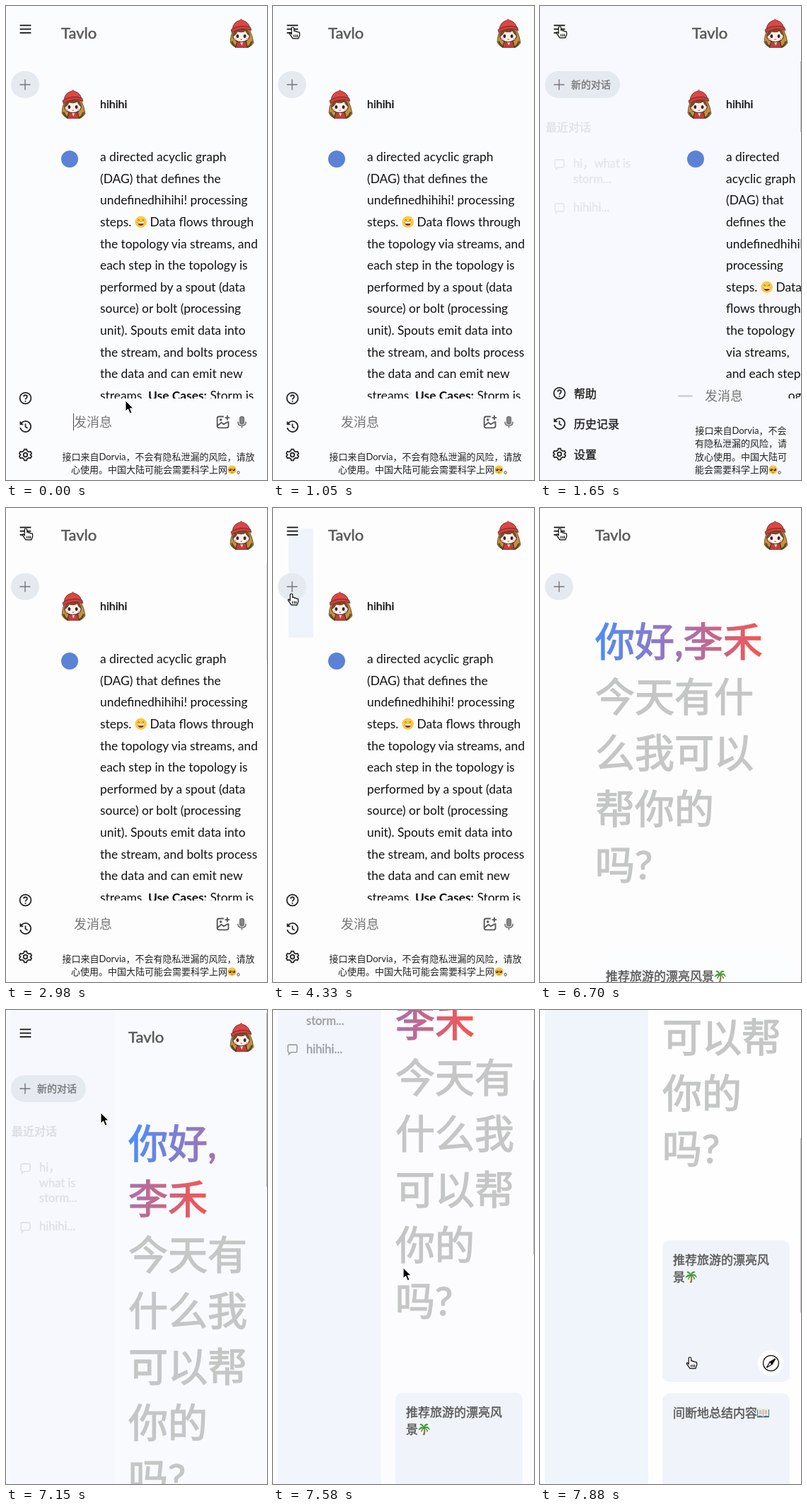
An HTML page for the animation above (8000 ms loop, 369 by 669 pixels).

```html
<!DOCTYPE html>
<html lang="zh-CN">
<head>
<meta charset="utf-8">
<style>
html, body { margin: 0; width: 100%; height: 100%; overflow: hidden; }
body { position: relative; background: #fcfdfe; font-family: Lato, "Noto Sans CJK SC", "Noto Sans CJK", sans-serif; }
div, body > svg, #page svg.icon { position: absolute; }
.text { white-space: pre; }
.emoji { width: 1em; height: 1em; vertical-align: -.13em; }
.hello { background: linear-gradient(90deg, #4b8dfa, #a273b5 50%, #f7554d); -webkit-background-clip: text; background-clip: text; color: transparent; }
#page { width: 369px; height: 1300px; }
#cursor { left: 0; top: 0; overflow: visible; }
</style>
</head>
<body>
<div id="page"></div>
<div id="thumb" style="left:368px;width:1px"></div>
<svg id="cursor" width="20" height="22">
  <path id="arrow" d="M1 0V15L4.6 11.8 7.2 18 9.9 16.9 7.3 10.9H12Z" fill="#000" stroke="#fff"/>
  <path id="hand" transform="scale(.88)" d="M-2 2Q-2 0 0 0T2 2V6Q4 5 5 7Q7 6 8 8Q11 7 11 10V13Q10 15 9 18H0L-5 11Q-6 9-4 9L-2 11ZM2 12V16M5 12V16M7.5 12V16" fill="#fff" stroke="#000" stroke-width="1.3"/>
</svg>
<script>
const LOOP = 8000, CHAT_OPEN = 1650, CHAT_CLOSE = 2830, NEW_CHAT = 4480, HOME_OPEN = 7000;
const SCROLL_START = 7250, SCROLL_END = 7880, SCROLL = 465;
const $ = id => document.getElementById(id);

const icons = {
  menu: '<path d="M3 6H21M3 12H21M3 18H21"/>',
  plus: '<path d="M12 3V21M3 12H21"/>',
  help: '<circle cx="12" cy="12" r="10"/><path d="M9 9.5Q9 6.5 12 6.5T15 9.5Q15 11 13.5 12T12 14.5M12 16.5V18.5"/>',
  history: '<path d="M4 7A9.5 9.5 0 1 1 2.8 14M3 3V8H8M12 7V12.5L16 15"/>',
  gear: '<path d="M10 2H14L15 5 18 6.7 21 6 23 9.5 20.8 12 23 14.5 21 18 18 17.3 15 19 14 22H10L9 19 6 17.3 3 18 1 14.5 3.2 12 1 9.5 3 6 6 6.7 9 5Z"/><circle cx="12" cy="12" r="3.5"/>',
  bubble: '<path d="M5 3H19Q21 3 21 5V16Q21 18 19 18H9L5 22V18Q3 18 3 16V5Q3 3 5 3Z"/>',
  image: '<path d="M13 3H5Q2 3 2 6V19Q2 22 5 22H18Q21 22 21 19V11M3 18L9 13 13 16 20 12M19 1V9M15 5H23"/><circle cx="8" cy="8.5" r="1"/>',
  mic: '<rect x="8.5" y="2" width="7" height="13" rx="3.5" fill="#888"/><path d="M5 11Q5 18 12 18T19 11M12 18V22"/>',
  compass: '<circle cx="12" cy="12" r="10.5"/><path d="M18 6L13.5 13.5 6 18 10.5 10.5Z"/><path d="M10.5 10.5L18 6 13.5 13.5Z" fill="#111"/>'
};
const emojiArt = {
  grin: '<circle cx="9" cy="9" r="8.5" fill="#fdc93f"/><path d="M4.5 7Q5.8 4.5 7 7M11 7Q12.2 4.5 13.5 7" fill="none" stroke="#65401c"/><path d="M4 9.5H14Q13 14.5 9 14.5T4 9.5Z" fill="#803a22"/><path d="M4.5 9.5H13.5V11.5H4.9Z" fill="#fff"/>',
  plead: '<circle cx="9" cy="9" r="8.5" fill="#fcc63a"/><circle cx="5.5" cy="9" r="2.8" fill="#503018"/><circle cx="12.5" cy="9" r="2.8" fill="#503018"/><path d="M7 14.5Q9 13 11 14.5" fill="none" stroke="#65401c"/><circle cx="4.8" cy="8" r="1" fill="#fff"/><circle cx="11.8" cy="8" r="1" fill="#fff"/>',
  palm: '<path d="M8 7Q10 12 7 18H10Q12 12 10 7Z" fill="#a8703a"/><path d="M9 7Q4 4 1 10Q4 8 9 7Q5 9 5 13Q7 9 9 7Q13 8 14 13Q15 9 9 7Q15 6 17 10Q16 3 9 7Q12 2 15 2Q10 0 9 6Q6 0 3 2Q6 3 9 7Z" fill="#3c9a32" stroke="#3c9a32"/>',
  book: '<path d="M0 4H18V16H0Z" fill="#3974a8"/><path d="M1 3Q6 1 9 4Q12 1 17 3V14Q12 12 9 15Q6 12 1 14Z" fill="#f2ead8"/><path d="M9 4V15M3 6H7M3 8H7M3 10H7M11 6H15M11 8H15M11 10H15" stroke="#9b948a" stroke-width=".8"/>'
};
const avatarArt = `<path d="M8 15Q4 24 4 32Q6 38 13 39L14 20ZM30 14Q35 24 36 33Q34 38 27 39L25 20Z" fill="#c4913c" stroke="#5a4020" stroke-width=".8"/>
  <path d="M6 31Q8 37 13 39M34 31Q32 37 28 39" fill="none" stroke="#5b4a25" stroke-width="2.5"/>
  <path d="M14 30H25L28 40H11Z" fill="#c63c38" stroke="#45302a"/><path d="M17 31L20 37 22 31" fill="#f3d8be"/>
  <ellipse cx="19" cy="23.5" rx="11.5" ry="8.5" fill="#fff0ea" stroke="#4b3028"/>
  <path d="M7 25Q8 15 19 13T31 24Q27 22 25 17Q20 20 14 18Q12 23 7 25Z" fill="#7b4a2c"/>
  <path d="M7 14Q8 4 18 2Q28 2 31 12Q19 8 7 14Z" fill="#dc4743" stroke="#652927" stroke-width=".8"/>
  <path d="M5 15Q18 7 32 12L33 16Q20 11 6 19Z" fill="#cf3f3e" stroke="#652927" stroke-width=".8"/><circle cx="19" cy="2" r="1.8" fill="#dc4743"/>
  <ellipse cx="14" cy="24" rx="1.9" ry="2.5" fill="#3b2429"/><ellipse cx="24" cy="24" rx="1.9" ry="2.5" fill="#3b2429"/>
  <circle cx="11" cy="27.5" r="1.5" fill="#f6b6a9"/><circle cx="27" cy="27.5" r="1.5" fill="#f6b6a9"/><path d="M18 28.5H20.5" stroke="#b35349"/>`;

const emoji = name => `<svg class="emoji" viewBox="0 0 18 18">${emojiArt[name]}</svg>`;
const svg = (x, y, size, box, body, attrs = '') =>
  `<svg class="icon" style="left:${x - size / 2}px;top:${y - size / 2}px" width="${size}" height="${size}" viewBox="0 0 ${box} ${box}" ${attrs}>${body}</svg>`;
const icon = (name, x, y, size = 18, color = '#222', weight = 2.2) =>
  svg(x, y, size, 24, icons[name], `fill="none" stroke="${color}" stroke-width="${weight}"`);
const avatar = (x, y) => svg(x, y, 41, 40, avatarArt);
const box = (x, y, w, h, color, radius = 0) =>
  `<div style="left:${x}px;top:${y}px;width:${w}px;height:${h}px;background:${color};border-radius:${radius}px"></div>`;
// y is the middle of the first line
const text = (x, y, html, size, color, lineHeight = 24, extra = '') =>
  `<div class="text" style="left:${x}px;top:${y - lineHeight / 2}px;font-size:${size}px;line-height:${lineHeight}px;color:${color};${extra}">${html}</div>`;
// a thin outline stands in for the medium weight
const medium = '-webkit-text-stroke-width:.025em';

function header(x) {
  return icon('menu', 27, 32, 21, '#111', 2) + text(x, 38, 'Tavlo', 22, '#585858', 28, medium) + avatar(333, 38);
}

function sidebar(open, width, topics) {
  let html = open ? `<div id="side" style="left:7px;top:0;width:${width - 7}px;height:1300px"></div>` : '';
  html += box(7, 92, open ? 106 : 40, 38, '#e5eaf1', 20) + icon('plus', 27, 111, 20, '#777', 1.7);
  if (!open) return html;
  html += text(44, 111, '新的对话', 14, '#777', 24, medium) + '<div id="recent">' +
    text(8, 171, '最近对话', 16, '#333', 24, 'font-weight:700');
  let y = 223;
  for (const topic of topics) {
    html += icon('bubble', 27, y, 17, '#444') + text(47, y, topic, 16.5, '#444', 21.5, medium);
    y += topic.split('\n').length * 21 + 20;
  }
  return html + '</div>';
}

function chatView(open) {
  const x = open ? 208 : 78;
  const story = open
    ? `a directed\nacyclic graph\n(DAG) that\ndefines the\nundefinedhihihi!\nprocessing\nsteps. ${emoji('grin')} Data\nflows through\nthe topology\nvia streams,\nand each step\nin the topology is`
    : `a directed acyclic graph\n(DAG) that defines the\nundefinedhihihi! processing\nsteps. ${emoji('grin')} Data flows through\nthe topology via streams, and\neach step in the topology is\nperformed by a spout (data\nsource) or bolt (processing\nunit). Spouts emit data into\nthe stream, and bolts process\nthe data and can emit new\nstreams. <b>Use Cases:</b> Storm is`;
  const note = open
    ? `接口来自Dorvia，不会\n有隐私泄漏的风险，请\n放心使用。中国大陆可\n能会需要科学上网${emoji('plead')}。`
    : `接口来自Dorvia，不会有隐私泄漏的风险，请放\n心使用。中国大陆可能会需要科学上网${emoji('plead')}。`;
  let html = sidebar(open, 195, ['hi，what is\nstorm...', 'hihihi...']) + header(open ? 215 : 78);
  html += avatar(x + 17, 138) + text(x + 55, 138, 'hihihi', 16, '#111', 24, medium);
  html += box(x, 204, 24, 24, '#5c82d6', 12);
  html += '<div style="left:0;top:0;width:369px;height:554px;overflow:hidden">' +
    text(x + 55, 213.5, story, 17.4, '#111', 30.6) + '</div>';
  if (open) html += '<div id="inputBack" style="left:195px;top:533px;width:155px;height:36px"></div>' +
    box(195, 549, 21, 3, '#d2d5da', 2) + text(233, 550, '发消息', 18, '#757575');
  else html += '<div id="caret" style="left:95px;top:575px;width:1px;height:24px;background:#444"></div>' +
    text(96, 587, '发消息', 18, '#757575') + icon('image', 307, 587, 20, '#555') + icon('mic', 333, 587, 19, '#777');
  html += text(x, open ? 599 : 636, note, 13, '#222', 18.4, `width:${open ? 152 : 275}px;text-align:center`);
  const rows = [['help', '帮助'], ['history', '历史记录'], ['gear', '设置']];
  rows.forEach(([name, label], i) => {
    const y = open ? 546 + 43 * i : 553 + 40 * i;
    html += icon(name, 27, y, 19);
    if (open) html += text(48, y + 1, label, 16, '#222', 24, medium);
  });
  return html;
}

function homeView(open) {
  const x = open ? 173 : 78, top = open ? 790 : 633, fill = open ? '#f0f4fa' : '#fcfdfe';
  const hello = `<span class="hello">你好,${open ? '\n' : ''}李禾</span>\n`;
  const ask = open ? '今天有\n什么我\n可以帮\n你的\n吗?' : '今天有什\n么我可以\n帮你的\n吗?';
  const cards = [`推荐旅游的漂亮风${open ? '\n' : ''}景${emoji('palm')}`, `间断地总结内容${emoji('book')}`];
  let html = sidebar(open, 153, ['hi，\nwhat is\nstorm...', 'hihihi...']) + header(x);
  html += text(x, 188, hello + ask, 56, '#c4c7c5', 78.8, medium);
  cards.forEach((label, i) => {
    const y = top + 216 * i;
    html += box(x, y, 353 - x, 200, fill, 10) + text(x + 15, y + 28, label, 17, '#585858', 24, medium) +
      box(308, y + 155, 36, 36, '#fff', 18) + icon('compass', 326, y + 173, 25, '#111', 1.2);
  });
  return html;
}

// time, x, y of the pointer tip
const path = [[0, 168, 557], [100, 168, 557], [1050, 28, 30], [1350, 28, 29], [3050, 28, 29], [3730, 40, 160],
  [4180, 26, 121], [4780, 26, 121], [4930, 66, 220], [5510, 115, 558], [5810, 261, 635], [6000, 261, 635],
  [6400, 26, 10], [6700, 28, 29], [7000, 28, 29], [7150, 133, 145], [7880, 212, 490], [8000, 212, 490]];
const clamp = v => Math.max(0, Math.min(1, v));
const smooth = v => v * v * (3 - 2 * v);
const mix = (a, b, p) => a + (b - a) * p;
const tint = (from, to, p) => `rgb(${from.map((v, i) => Math.round(mix(v, to[i], p)))})`;

function pointer(t) {
  const i = path.findIndex(point => point[0] > t);
  const [t0, x0, y0] = path[i - 1], [t1, x1, y1] = path[i];
  const p = smooth((t - t0) / (t1 - t0));
  return [mix(x0, x1, p), mix(y0, y1, p)];
}

let shown;
function draw(t) {
  const home = t >= NEW_CHAT;
  const open = home ? t >= HOME_OPEN : t >= CHAT_OPEN && t < CHAT_CLOSE;
  const key = `${home}${open}`;
  if (key !== shown) {
    $('page').innerHTML = (home ? homeView : chatView)(open);
    shown = key;
  }
  let back = home || t >= CHAT_CLOSE ? '#fdfdfe' : '#fbfcfe';
  if (open) {
    const p = clamp((t - (home ? HOME_OPEN : CHAT_OPEN)) / 880);
    back = tint([247, 249, 254], [254, 254, 255], p);
    $('side').style.background = tint([247, 249, 254], [240, 244, 251], p);
    $('recent').style.opacity = .1 + .9 * p * p;
    if (!home) $('inputBack').style.background = back;
  }
  document.body.style.background = !home && t >= 3730
    ? 'linear-gradient(#eff3fb, #eff3fb) 22px 29px / 35px 154px no-repeat #fdfdfe' : back;
  const caret = $('caret');
  if (caret) caret.hidden = t >= CHAT_OPEN || t % 1200 >= 600;

  const scroll = SCROLL * smooth(clamp((t - SCROLL_START) / (SCROLL_END - SCROLL_START)));
  $('page').style.top = -scroll + 'px';
  const thumb = $('thumb');
  thumb.hidden = !(open || t >= CHAT_CLOSE && t < 3600);
  thumb.style.top = (home ? 4 + scroll * .38 : 78) + 'px';
  thumb.style.height = (home ? 246 : open ? 100 : 137) + 'px';
  thumb.style.background = open ? '#bbb' : '#e4e4e4';

  const [x, y] = pointer(t);
  const cardY = y + scroll - (open ? 790 : 633);
  const overCard = home && x > 78 && cardY > 0 && cardY < 200;
  const hand = overCard || x < 48 && (y > 12 && y < 50 || y > 92 && y < 131);
  $('hand').style.display = hand ? '' : 'none';
  $('arrow').style.display = hand ? 'none' : '';
  $('cursor').style.transform = `translate(${x}px,${y}px)`;
}

function tick(now) {
  draw(now % LOOP);
  requestAnimationFrame(tick);
}
draw(0);
requestAnimationFrame(tick);
</script>
</body>
</html>
```
